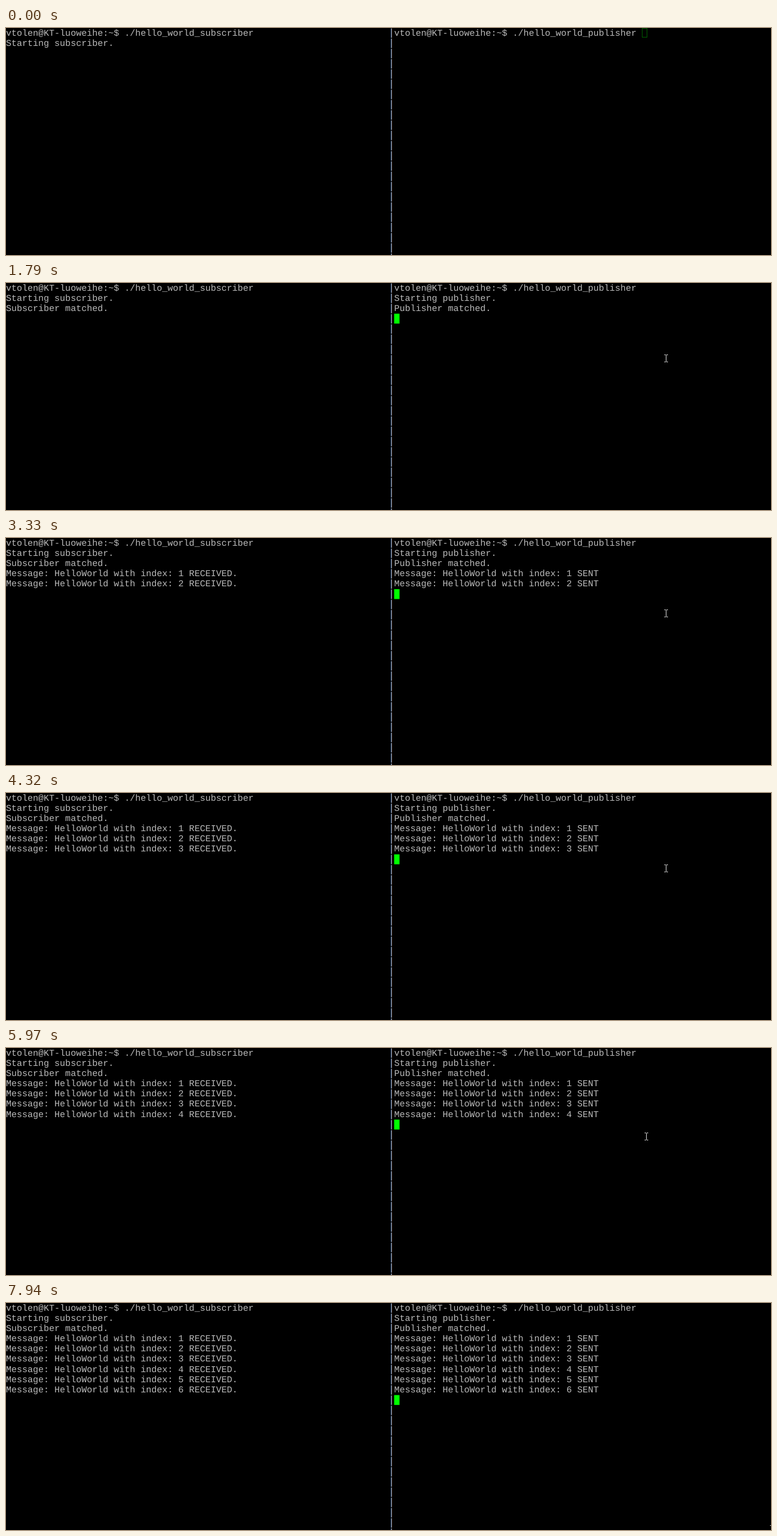
An HTML page that plays this animation: 1280 px wide and 381 px high, repeating every 8 s.

```html
<!DOCTYPE html>
<html lang="en">
<head>
<meta charset="utf-8">
<title>Publisher and subscriber terminals</title>
<style>
  html, body { margin: 0; width: 100%; height: 100%; overflow: hidden; background: #000; }
  svg { display: block; }
  text {
    font: 15.033px "Liberation Mono", "Courier New", monospace;
    fill: #bbb;
    text-rendering: geometricPrecision;
  }
</style>
</head>
<body>
<svg id="stage" width="1280" height="381" viewBox="0 0 1280 381">
  <rect width="1280" height="381"/>
  <g id="divider"></g>
  <g id="lines"></g>
  <rect id="filled" width="9" height="16.6" fill="#0f0"/>
  <rect id="hollow" x="1064.5" y=".5" width="8" height="15" fill="none" stroke="#005c00"/>
  <path id="mouse" fill="none" stroke="#ddd"
        d="M-2.5 -5.5h2.5m1 0h2.5M-2.5 6.5h2.5m1 0h2.5M.5 -5v11"/>
</svg>
<script>
const LOOP = 8000, FRAME = 67;
const COL = 9.02, ROW = 17.17, RIGHT = 72 * COL;
const FOCUS = 730, ENTER = 1330;
const $ = id => document.getElementById(id);

function add(parent, tag, attrs, text = '') {
  const el = document.createElementNS('http://www.w3.org/2000/svg', tag);
  for (const key in attrs) el.setAttribute(key, attrs[key]);
  el.textContent = text;
  parent.append(el);
  return el;
}

function show(el, visible) {
  el.setAttribute('visibility', visible ? 'visible' : 'hidden');
}

// A pane is a list of lines, each with the time it appears.
function pane(x, role, started, matched, outcome) {
  const lines = [];
  const print = (time, text) => lines.push({
    time,
    el: add($('lines'), 'text', { x, y: lines.length * ROW + 12.6 }, text)
  });
  print(0, `vtolen@KT-luoweihe:~$ ./hello_world_${role}`);
  print(started, `Starting ${role}.`);
  print(matched, `${role[0].toUpperCase()}${role.slice(1)} matched.`);
  for (let i = 1; i <= 6; i++)
    print(1320 + i * 1000, `Message: HelloWorld with index: ${i} ${outcome}`);
  return lines;
}

const left = pane(0, 'subscriber', 0, 1660, 'RECEIVED.');
const right = pane(RIGHT, 'publisher', 1390, 1790, 'SENT');

// One bar per row, with a cool left and a warm right edge.
for (let y = 0.7; y < 381; y += ROW) {
  add($('divider'), 'rect', { x: 644, y, width: 1, height: 15.8, fill: '#5f93d6' });
  add($('divider'), 'rect', { x: 645, y, width: 1, height: 15.8, fill: '#86684a' });
}

// The pointer waits below the stage, then makes these moves.
const home = { x: 1260, y: 390 };
const moves = [
  { start: 130, length: 600, x: 1104, y: 126 },
  { start: 5250, length: 200, x: 1071, y: 148 },
  { start: 5970, length: 620, x: 1141, y: 207 },
  { start: 7470, length: 469, x: 1281, y: 379 }
];

function pointer(t) {
  let { x, y } = home;
  for (const move of moves) {
    const elapsed = Math.floor((t - move.start) / FRAME) * FRAME;
    const p = Math.max(0, Math.min(1, elapsed / move.length));
    const ease = p * p * (3 - 2 * p);
    x += (move.x - x) * ease;
    y += (move.y - y) * ease;
  }
  return [Math.round(x), Math.round(y)];
}

function draw(t) {
  for (const { time, el } of [...left, ...right]) show(el, t >= time);

  const entered = t >= ENTER;
  const row = entered ? right.filter(line => t >= line.time).length : 0;
  $('filled').setAttribute('x', RIGHT + (entered ? 0 : 46 * COL));
  $('filled').setAttribute('y', row * ROW);
  show($('filled'), t >= FOCUS);
  show($('hollow'), t < FOCUS);

  $('mouse').setAttribute('transform', `translate(${pointer(t)})`);
}

const begin = performance.now();
function tick() {
  draw((performance.now() - begin) % LOOP);
  requestAnimationFrame(tick);
}
tick();
</script>
</body>
</html>
```
